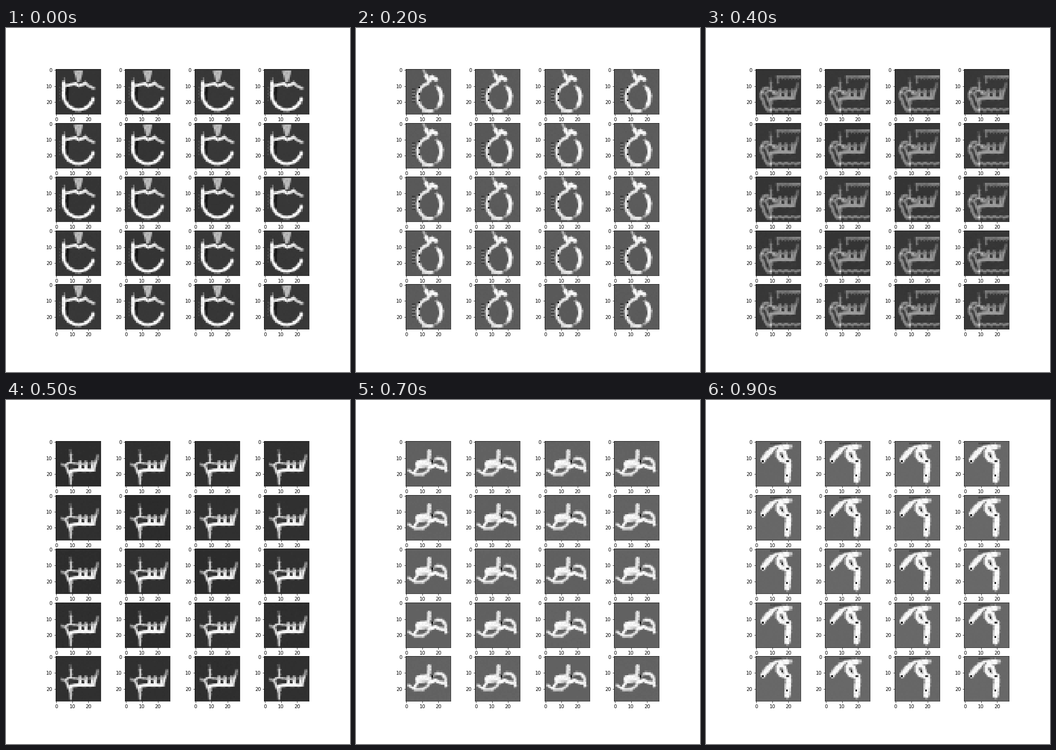
A matplotlib script that plays this animation: 720x720 px, repeating every 1 s.

```python
import numpy as np
import matplotlib.pyplot as plt
from matplotlib.animation import FuncAnimation

ROWS, COLS, SIZE = 5, 4, 28
Y, X = np.mgrid[:SIZE, :SIZE].astype(float)
rng = np.random.default_rng(4)


def distance(a, b):
    """Distance of every cell centre from the segment a-b."""
    dx, dy = b[0] - a[0], b[1] - a[1]
    length2 = dx * dx + dy * dy or 1
    t = np.clip(((X - a[0]) * dx + (Y - a[1]) * dy) / length2, 0, 1)
    return np.hypot(X - a[0] - t * dx, Y - a[1] - t * dy)


def stroke(img, level, width, *pts):
    """Blend a slightly uneven brush line into the image."""
    d = np.min([distance(a, b) for a, b in zip(pts, pts[1:])], axis=0)
    d += rng.uniform(-0.15, 0.15, d.shape)
    cover = np.clip(width / 2 + 0.5 - d, 0, 1)
    img += (level * rng.uniform(0.93, 1, d.shape) - img) * cover


def dot(img, level, x, y):
    img[y, x] = level


def arc(cx, cy, rx, ry, start, end):
    a = np.radians(np.linspace(start, end, 24))
    return list(zip(cx + rx * np.cos(a), cy + ry * np.sin(a)))


def canvas(level):
    return np.full((SIZE, SIZE), level)


def hoop():
    g = canvas(0.21)
    stroke(g, 0.08, 1.4, (7, 11), (6.6, 18))
    for y in range(11, 20, 2):
        dot(g, 0.3, 2, y)
    stroke(g, 0.45, 1, (5, 5), (5, 8))
    for y in range(1, 8):
        half = 2.5 - 0.27 * y
        stroke(g, 0.75, 1, (13.7 - half, y), (13.7 + half, y))
    stroke(g, 0.85, 1.8, (18, 8.3), (20, 10), (23, 11.3))
    stroke(g, 0.95, 1.9, (5, 10), (12, 8.5), (14, 10), (18, 8.3))
    stroke(g, 1, 2, (4.5, 8), (4.5, 16))
    stroke(g, 1, 2, *arc(13.8, 15.6, 9.3, 9.2, 16, 180))
    return g


def ring():
    g = canvas(0.35)
    for y in range(12, 21):
        stroke(g, 0.5 if y % 2 else 0.25, 0.8, (4, y), (5, y))
    stroke(g, 0.75, 1.5, (10.6, 0), (12.5, 4))
    stroke(g, 1, 2.6, (12.5, 4), (14, 7), (16, 4.5), (18.5, 6))
    stroke(g, 0.95, 2, *arc(14.5, 17, 7.4, 8.6, 85, 262))
    stroke(g, 0.7, 1.5, *arc(14.5, 17, 7.4, 8.6, -55, 58))
    stroke(g, 1, 2.4, *arc(14.5, 17, 7.2, 8.6, -40, 35))
    stroke(g, 0.93, 1.8, (10.5, 25.5), (16.3, 25.5))
    for y in range(11, 20, 4):
        dot(g, 0.05, 8, y)
    return g


def hook():
    g = canvas(0.24)
    stroke(g, 0.28, 1.5, (19, 23), (24, 20.7))
    stroke(g, 0.33, 1.5, (8, 15), (9, 17))
    stroke(g, 0.95, 1.4, (13, 4.4), (27, 4.4))
    for x in range(16, 27, 2):
        dot(g, 0.45, x, 6)
    stroke(g, 0.75, 1.4, (13.3, 5), (13.3, 8))
    stroke(g, 0.5, 1.5, (7, 11.5), (10, 14))
    stroke(g, 0.98, 2, (10.5, 14.5), (12.5, 15.2))
    stroke(g, 0.92, 1.9, (7, 11.2), (5, 11.6), (3, 14), (2.7, 17),
           (4.3, 19), (5, 22), (7, 25))
    zigzag = [(x, 24.7 + 0.35 * (-1) ** (x // 2)) for x in range(7, 28)]
    stroke(g, 0.9, 1.5, *zigzag)
    dot(g, 0.02, 13, 13)
    return g


def crown():
    g = canvas(0.18)
    stroke(g, 0.4, 1.3, (8.5, 5), (8.8, 8))
    stroke(g, 0.8, 1.4, (9, 8), (9, 12.5))
    stroke(g, 0.65, 1.8, (3.5, 14), (6, 15.3))
    stroke(g, 0.9, 1.3, (6, 14), (8, 13), (17, 14))
    stroke(g, 0.22, 2.5, (9, 16), (10, 16))
    stroke(g, 0.85, 1.4, (6, 15), (7, 18), (8, 20))
    stroke(g, 1, 2.3, (8.8, 18.5), (8.8, 21))
    stroke(g, 0.8, 1.4, (9, 20), (8.8, 26))
    stroke(g, 1, 1.9, (10, 18), (13, 17.5), (23, 17.6))
    for x in (14.6, 18.5, 22.3):
        stroke(g, 1, 1.7, (x, 12.8), (x, 17))
        stroke(g, 0.6, 1, (x - 2, 13.5), (x, 13.5))
    stroke(g, 0.95, 1.5, (23.3, 17), (25, 11))
    stroke(g, 0.6, 1.5, (25, 11), (25.6, 8.5))
    return g


def fish():
    g = canvas(0.38)
    stroke(g, 0.6, 1.2, (5, 21), (11, 21))
    stroke(g, 0.95, 1.6, (1.5, 17.8), (5, 20), (10, 20.2), (14, 17.5))
    stroke(g, 1, 1.8, (7, 16), (5, 19))
    stroke(g, 1, 5, (8, 14), (13, 13.2))
    stroke(g, 0.95, 2.4, (14.2, 5.8), (13.8, 12))
    stroke(g, 0.8, 1.4, (10, 15.5), (15, 15))
    stroke(g, 0.65, 1.5, (17, 12), (19, 10))
    stroke(g, 1, 2.2, (14, 16), (18, 14.7), (21, 16), (24, 16.5))
    stroke(g, 0.95, 2, (19, 10.2), (22, 10.4), (24.2, 13), (24.6, 18))
    stroke(g, 0.28, 1.2, (15.5, 11), (16, 13))
    dot(g, 0.02, 16, 12)
    return g


def hanger():
    g = canvas(0.24)
    stroke(g, 0.6, 1.6, (12, 1), (11.6, 6))
    stroke(g, 0.98, 2, (11.8, 2), (11, 5.5))
    stroke(g, 0.6, 1.4, (12, 6.5), (13.2, 9))
    stroke(g, 0.92, 1.6, (13.3, 9), (14, 13))
    stroke(g, 0.85, 1.4, (1, 9.7), (2.2, 14))
    stroke(g, 0.55, 1.4, (13, 14.6), (19, 15))
    stroke(g, 0.92, 1.7, (2, 14.6), (12, 14.6))
    stroke(g, 0.95, 2, (15.5, 12.5), (17, 10.5), (17, 12.5))
    dot(g, 0.45, 16, 8)
    for x in (15, 17):
        dot(g, 0.05, x, 10)
    stroke(g, 0.98, 1.9, (19.5, 17.3), (19.6, 20), (18.8, 20.4))
    return g


def arch():
    g = canvas(0.40)
    stroke(g, 0.3, 0.8, (9, 1), (15, 1))
    stroke(g, 0.8, 2.4, (18, 3), (21.5, 2.8))
    stroke(g, 1, 3.3, (4.2, 11.3), (6, 8.7), (9, 5.5), (13, 3.7), (19, 3))
    stroke(g, 1, 2.7, (13.5, 5), (13.3, 8.5), (15.5, 11.2), (19, 12.5))
    stroke(g, 1, 2.4, (15, 5), (17.3, 6.5), (18.6, 10.5))
    stroke(g, 1, 3.6, (19.8, 12), (19.8, 17), (19.3, 24))
    stroke(g, 0.45, 0.8, (11, 6), (13, 4))
    stroke(g, 0.2, 0.9, (19, 12), (20, 12))
    for x, y in ((4, 12), (16, 9), (19, 21)):
        dot(g, 0.1, x, y)
    return g


def blend(a, b):
    return (a + b) / 2


c, o, h, k, f, t, r = [draw() for draw in
                       (hoop, ring, hook, crown, fish, hanger, arch)]
GLYPHS = [c, blend(c, o), o, h, blend(h, k), k, blend(k, f), f, t, r]

# Each panel has its own slight lift of the dark tones.
LIFT = rng.uniform(-0.01, 0.015, ROWS * COLS)

plt.rcParams.update({"font.family": "DejaVu Sans", "font.size": 10})
fig, axes = plt.subplots(ROWS, COLS, figsize=(10, 10), dpi=72, facecolor="white")
fig.subplots_adjust(left=0.125, right=0.9, bottom=0.125, top=0.88,
                    wspace=0.2, hspace=0.2)
images = []
for ax in axes.flat:
    images.append(ax.imshow(GLYPHS[0], cmap="gray", vmin=0, vmax=1,
                            interpolation="nearest"))
    ax.set_xticks(range(0, SIZE, 10))
    ax.set_yticks(range(0, SIZE, 10))


def update(i):
    noise = np.random.default_rng(i)
    glyph = GLYPHS[i]
    for image, lift in zip(images, LIFT):
        grain = noise.normal(0, 0.003, glyph.shape)
        image.set_data(np.clip(glyph + (lift + grain) * (1 - glyph), 0, 1))
    return images


anim = FuncAnimation(fig, update, frames=len(GLYPHS), interval=100,
                     repeat=True, repeat_delay=0, blit=False)
plt.show()
```
